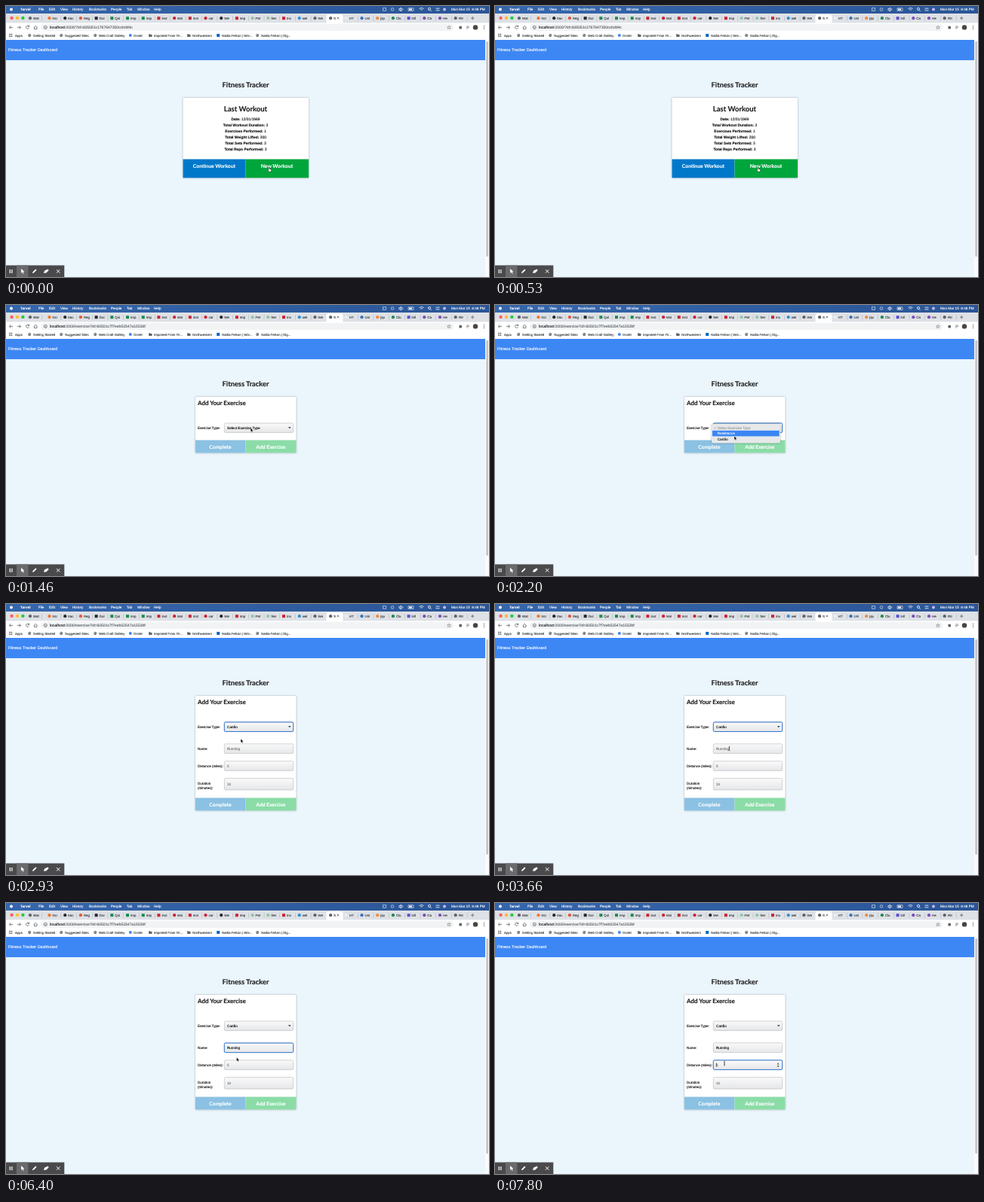
These frames come from a looping animation (640x360 px, 8 s). An HTML page:

```html
<!DOCTYPE html>
<html lang="en">
<head>
<meta charset="utf-8">
<title>Fitness Tracker</title>
<style>
html, body { margin: 0; width: 100%; height: 100%; overflow: hidden; }
svg { display: block; width: 640px; height: 360px; background: #ebf5fc; }
text { font-family: "Liberation Sans", Arial, sans-serif; text-rendering: geometricPrecision; white-space: pre; stroke-width: .13; }
.lato { font-family: Lato, sans-serif; font-weight: 700; }
.bold { font-weight: 700; }
.mid { text-anchor: middle; }
.card { filter: drop-shadow(0 .5px 1px #0005); }
.line { fill: none; stroke: #5f6368; stroke-width: .8; }
.white { fill: none; stroke: #fff; stroke-width: .8; }
.field { fill: url(#fieldFill); stroke: #b4b8bc; stroke-width: .6; }
.focus { fill: none; stroke: #3579d0; stroke-width: 1; }
</style>
</head>
<body>
<svg id="stage" viewBox="0 0 640 360"></svg>
<script>
const DURATION = 8000;
const CLICK = { page: 800, reload: 1060, select: 1600, cardio: 2600, name: 3760, distance: 6830 };
const KEYS = [5000, 5130, 5260, 5400, 5500, 5600, 5730];
const NAME = 'Running';

// Pointer stops: time, x, y
const PATH = [
  [0, 349, 217], [980, 349, 217], [1480, 324, 163], [1750, 324, 163], [2150, 317, 174],
  [2230, 317, 174], [2420, 311, 179], [3180, 311, 179], [3620, 310.5, 192],
  [6120, 310.5, 192], [6400, 305.5, 205], [6700, 304, 213], [8000, 304, 213]
];

const rect = (x, y, w, h, fill, extra = '') =>
  `<rect x="${x}" y="${y}" width="${w}" height="${h}" fill="${fill}" ${extra}/>`;
const dot = (x, y, r, fill) => `<circle cx="${x}" cy="${y}" r="${r}" fill="${fill}"/>`;
const path = (d, cls, extra = '') => `<path d="${d}" class="${cls}" ${extra}/>`;
// Text is placed by its left edge (or middle) and its vertical centre
const text = (x, y, size, str, fill = '#222', cls = '', id = '') =>
  `<text x="${x}" y="${y + size * .35}" font-size="${size}" fill="${fill}" stroke="${fill}" class="${cls}" id="${id}">${str}</text>`;
const group = (id, body, cls = '') => `<g id="${id}" class="${cls}">${body}</g>`;
const box = (y, h, cls = 'field', id = '') =>
  `<rect x="289.3" y="${y}" width="91.4" height="${h}" rx="1.5" class="${cls}" id="${id}"/>`;
const globe = (x, y) => dot(x, y, 2, '#5f6368') + path(`M${x - 1.3} ${y - .5}h1.4l1 1.2`, 'white', 'stroke-opacity=".8"');

function menuBar() {
  const items = [[43, 'File'], [57, 'Edit'], [72, 'View'], [88, 'History'], [110, 'Bookmarks'],
    [139, 'People'], [160, 'Tab'], [174, 'Window'], [196, 'Help']];
  return rect(0, 0, 640, 10, 'url(#barFill)') + dot(7, 4.5, 1.9, '#fff') +
    text(19, 4.6, 4.7, 'Tarvel', '#fff', 'bold') +
    items.map(([x, s]) => text(x, 4.6, 4.6, s, '#fff')).join('') +
    path('M499.5 2.7h4v3.6h-4zM513.8 4.5a1.8 1.8 0 1 1-3.6 0a1.8 1.8 0 1 1 3.6 0', 'white', 'opacity=".7"') +
    path('M521 3.5h1l1.5-1.2v4.6l-1.5-1.2h-1zM525 3q1.3 1.5 0 3', 'white') +
    path('M533 2.8h7v3.6h-7z', 'white', 'opacity=".7"') + rect(534, 3.6, 4, 2, '#fff') +
    path('M547.5 3.6q3-2.4 6 0M549 5.1q1.5-1 3 0', 'white') +
    path('M562.3 5.6l1.4 1.4M562.6 4a1.6 1.6 0 1 1-3.2 0a1.6 1.6 0 1 1 3.2 0', 'white') +
    path('M569.5 3.2h5M569.5 5.8h5', 'white') + dot(581, 4.5, 2, '#c9b8e8') +
    text(590, 4.6, 4.65, 'Mon Mar 15  8:48 PM', '#fff');
}

function tabs() {
  const names = 'Wat NU trac Reg Gui Qui Imp Imp Inst Moi Inst car We Imp FW Ser Ins wel We S HT Uni jqu Clu infi Ca He Fitr'.split(' ');
  const [grey, red, green, ink] = ['#5f6368', '#cb2431', '#1d8a4a', '#24292e'];
  const colors = [grey, '#f2762e', ink, '#e0573c', ink, green, green, green, red, red, red, red, ink, red,
    '#8fc7a3', '#8fc7a3', red, '#2d8fd5', grey, grey, '#e8eef2', '#3672b9', '#f08a3c', green, '#5a4fcf', '#7a4fb5', '#7a4fb5', grey];
  let out = rect(0, 10, 640, 12.5, '#dee1e6') + rect(424.5, 11.5, 22, 11.5, '#fff', 'rx="2"');
  ['#ff5f57', '#febc2e', '#28c840'].forEach((c, i) => out += dot(7.6 + 7.4 * i, 15.9, 2.2, c));
  names.forEach((name, i) => {
    const x = i ? 36.8 + 20.7 * i : 32;
    const square = [4, 5, 6, 7, 8, 10, 13, 16, 24].includes(i);
    out += square ? rect(x - 2, 14.2, 4, 4, colors[i]) : dot(x, 16.2, 2.1, colors[i]);
    out += text(x + 4, 16.2, 4.4, name, '#3c4043');
    if (i !== 18 && i !== 19) out += rect(x + 15.2, 13.5, .4, 6, '#9aa0a6');
  });
  return out + path('M438.6 14.8l2.6 2.6m0-2.6l-2.6 2.6', 'line') + path('M616 16.2h4.4m-2.2-2.2v4.4', 'line');
}

function toolbar() {
  const marks = [[36, 'Getting Started'], [78, 'Suggested Sites'], [123, 'Web Craft Gallery'], [169, 'Orvlet'],
    [196, 'Imported From Fir...'], [247, 'Northwestern'], [286, 'Nadia Felson | Wor...'], [338, 'Nadia Felson | Dig...']];
  let out = rect(0, 22.5, 640, 22.5, '#fff') + rect(46, 23.7, 547, 9.4, '#f1f3f4', 'rx="4.7"') +
    path('M9 28.4H4.4m2.1-2.1l-2.1 2.1l2.1 2.1M15 28.4h4.6m-2.1-2.1l2.1 2.1l-2.1 2.1', 'line') +
    group('reloadIcon', path('M30.5 27.2a2.1 2.1 0 1 0 .1 2M30.8 25.6v1.9h-1.9', 'line')) +
    group('stopIcon', path('M27 26.6l3.6 3.6m0-3.6l-3.6 3.6', 'line')) +
    path('M36.8 28.6l2.4-2.3l2.4 2.3M37.5 28.2v2.5h3.4v-2.5', 'line') +
    path('M54.3 28.4a2 2 0 1 1-4 0a2 2 0 1 1 4 0M52.3 28v1.5', 'line', 'stroke-width=".6"') +
    `<text x="58" y="30.1" font-size="5.05" fill="#5f6368" stroke="#5f6368"><tspan fill="#202124" stroke="#202124">localhost</tspan><tspan id="url"></tspan></text>` +
    path('M587 26.1l.7 1.6l1.7.1l-1.3 1.1l.5 1.7l-1.6-1l-1.6 1l.5-1.7l-1.3-1.1l1.7-.1z', 'line', 'style="stroke-width:.5"') +
    rect(600.4, 26.8, 3.6, 3.6, '#5f6368', 'rx="1"') + path('M610 27h4M610 28.5h4M610 30h2.4', 'line', 'style="stroke-width:.6"') +
    dot(622, 28.4, 3.2, '#4b4540');
  [26.4, 28.4, 30.4].forEach(y => out += dot(633.5, y, .55, '#5f6368'));
  for (let i = 0; i < 9; i++) out += rect(4 + i % 3 * 1.6, 36.8 + (i / 3 | 0) * 1.6, 1.1, 1.1, '#5f6368');
  out += text(12, 39, 4.35, 'Apps', '#3c4043');
  marks.forEach(([x, s], i) => {
    const at = x - 4.8;
    if (i === 3) out += dot(at + .6, 39, 2, '#4285f4');
    else if (i === 4 || i === 5) out += path(`M${at - 2} 37.2h1.6l.7.8h2v3h-4.3z`, '', 'fill="#5f6368"');
    else if (i === 6) out += rect(at - 2, 37, 4, 4, '#0a66c2');
    else out += globe(at, 39);
    out += text(x, 39, 4.35, s, '#3c4043');
  });
  return out;
}

function lastWorkout() {
  const rows = [['Date', '12/31/1969'], ['Total Workout Duration', 3], ['Exercises Performed', 1],
    ['Total Weight Lifted', 200], ['Total Sets Performed', 3], ['Total Reps Performed', 3]];
  return group('', rect(234.5, 122, 166.5, 106.3, '#fff', 'rx="1"'), 'card') +
    rect(234.5, 203.5, 83, 24.8, '#0078ca') + rect(317.5, 203.5, 83.5, 24.8, '#00a63c') +
    text(317.5, 136.5, 9.5, 'Last Workout', '#1b1c1d', 'lato mid') +
    rows.map(([k, v], i) => text(317.5, 150.3 + 8 * i, 4.9, `<tspan font-weight="700">${k}:</tspan> ${v}`, '#111', 'mid')).join('') +
    text(276, 212.3, 6.8, 'Continue Workout', '#fff', 'lato mid') +
    text(359, 212.3, 6.8, 'New Workout', '#fff', 'lato mid');
}

function exercise() {
  const label = (y, s) => text(254, y, 4.55, s, '#111');
  return group('', rect(251, 122, 133.5, 74.5, '#fff', 'rx="1" id="card"'), 'card') +
    text(254, 130.3, 8, 'Add Your Exercise', '#1b1c1d', 'lato') +
    label(163.2, 'Exercise Type:') + box(157, 12.4) + box(156.9, 12.6, 'focus', 'selectFocus') +
    text(293, 163.2, 4.7, '', '#000', '', 'selected') +
    path('M374 162.1h3.6l-1.8 2.1z', '', 'fill="#234a72"') +
    group('form',
      label(192.5, 'Name:') + label(215.2, 'Distance (miles):') + label(238.4, 'Duration') + label(244.4, '(minutes):') +
      box(185.8, 12.8) + box(208.8, 12.6) + box(231.6, 15.4) +
      text(293, 192.3, 4.6, '', '#111', '', 'name') + text(293, 215.2, 4.6, '5', '#777') + text(293, 239.4, 4.6, '10', '#777') +
      box(186, 12.6, 'focus', 'nameFocus') + box(208.8, 12.6, 'focus', 'distanceFocus') +
      group('spinner', path('M373.6 214.5h3l-1.5-2.2zM373.6 216h3l-1.5 2.2z', '', 'fill="#555"')) +
      rect(293, 189.6, .6, 5.4, '#111', 'id="nameCaret"') + rect(292.9, 212.4, .6, 5.4, '#111', 'id="distanceCaret"')) +
    group('buttons',
      rect(251, 179.5, 66.5, 17, '#8bc1e2', 'id="blue"') + rect(317.5, 179.5, 67, 17, '#8bdca7', 'id="green"') +
      group('buttonText', text(284, 188.3, 6.8, 'Complete', '#fff', 'lato mid') +
        text(350.8, 188.3, 6.8, 'Add Exercise', '#fff', 'lato mid'))) +
    group('menu',
      group('', rect(287, 158, 91, 25.6, '#e6e8ea', 'rx="2"'), 'card') +
      rect(288, 166.8, 88.7, 7.6, '#3a86f5', 'id="rowMark"') +
      path('M290.3 163.3l1 1.1l1.6-2.7', 'line', 'style="stroke:#999;stroke-width:.6"') +
      text(294.7, 163.1, 4.7, 'Select Exercise Type', '#999') +
      text(294.7, 170.8, 4.7, 'Resistance', '#111', '', 'row0') + text(294.7, 178.6, 4.7, 'Cardio', '#111', '', 'row1'));
}

function recorder() {
  return rect(0, 344.5, 77.3, 15.5, '#4a4a4c') + rect(14, 344.5, 15.5, 15.5, '#6a6a6d') +
    path('M5.3 350v5M7.9 350v5', 'white', 'style="stroke-width:1.2"') +
    path('M20 349l.2 5.8l1.4-1.2l1.1 2.2l1-.5l-1.1-2.1l1.8-.2z', '', 'fill="#fff"') +
    path('M35 355l.5-1.8l3.8-3.8l1.3 1.3l-3.8 3.8z', '', 'fill="#fff"') +
    path('M49.8 354.8l1.4-3.4l4.4-2l1 1.8l-3.2 3.4z', '', 'fill="#fff"') +
    path('M67 350.2l4.4 4.4m0-4.4l-4.4 4.4', 'white', 'style="stroke-width:1"');
}

document.getElementById('stage').innerHTML =
  `<defs><linearGradient id="fieldFill" x2="0" y2="1"><stop stop-color="#fafafa"/><stop offset="1" stop-color="#e5e6e8"/></linearGradient>
  <linearGradient id="barFill"><stop stop-color="#3566ac"/><stop offset="1" stop-color="#2a5596"/></linearGradient></defs>` +
  rect(635, 45, 5, 315, '#fafafa') + rect(636.3, 47, 2.6, 286, '#c1c1c1', 'rx="1.3"') +
  rect(0, 45, 635, 27, '#3d87f5') + text(3, 57.6, 5.45, 'Fitness Tracker Dashboard', '#fff') +
  text(317.5, 105, 9.3, 'Fitness Tracker', '#1b1c1d', 'lato mid') +
  menuBar() + tabs() + toolbar() + group('home', lastWorkout()) + group('exercise', exercise()) + recorder() +
  group('status', rect(-1, 352.8, 214, 9, '#dee1e6', 'rx="1" stroke="#b5b9be" stroke-width=".5"') +
    text(1.5, 356.8, 4.4, 'Waiting for localhost...', '#3c4043')) +
  group('pointer',
    group('arrow', path('M0 0v5.2l1.2-1l.8 1.9l.9-.4l-.8-1.8h1.6z', '', 'fill="#000" stroke="#fff" stroke-width=".4"')) +
    group('hand', path('M-1.2-2.6q.7-.6 1.1.2l.2 1.8l2.2.5q.6.3.3 1.6l-.5 1.7h-2.6l-1.8-2.2q0-.8.9-.2z', '', 'fill="#fff" stroke="#000" stroke-width=".5"')) +
    group('beam', path('M-1-2.8q1 0 1 .7v4.2q0 .7-1 .7M1-2.8q-1 0-1 .7v4.2q0 .7 1 .7', 'line', 'style="stroke:#222;stroke-width:.5"')));

const el = {};
document.querySelectorAll('svg [id]').forEach(node => { if (node.id) el[node.id] = node; });
const show = (id, on) => { el[id].style.display = on ? '' : 'none'; };
const setText = (id, str) => { if (el[id].textContent !== str) el[id].textContent = str; };
const setInk = (id, color) => ['fill', 'stroke'].forEach(attr => el[id].setAttribute(attr, color));

function pointerAt(t) {
  const i = PATH.findIndex(stop => stop[0] > t);
  const [t0, x0, y0] = PATH[i - 1], [t1, x1, y1] = PATH[i];
  const u = (t - t0) / (t1 - t0), k = u * u * (3 - 2 * u);
  return [x0 + (x1 - x0) * k, y0 + (y1 - y0) * k];
}

function render(t) {
  const onHome = t < CLICK.page, loading = !onHome && t < CLICK.reload, cardio = t >= CLICK.cardio;
  show('home', onHome);
  show('exercise', !onHome);
  show('status', loading);
  show('stopIcon', loading);
  show('reloadIcon', !loading);
  setText('url', ':3000/' + (onHome ? '?id=605051c1767647350ccbdd4c' : loading ? 'exercise' : 'exercise?id=60501c7f7eeb52547a1553bf'));

  el.blue.setAttribute('fill', loading ? '#a9d4ee' : '#8bc1e2');
  el.green.setAttribute('fill', loading ? '#a6e6bc' : '#8bdca7');
  el.buttonText.setAttribute('opacity', loading ? .35 : 1);
  el.buttons.setAttribute('transform', `translate(0 ${cardio ? 78 : 0})`);
  el.card.setAttribute('height', cardio ? 152.5 : 74.5);
  setText('selected', cardio ? 'Cardio' : 'Select Exercise Type');
  show('form', cardio);

  const [x, y] = pointerAt(t);
  const row = y > 174.8 ? 1 : y > 166.8 ? 0 : -1;
  show('menu', t >= CLICK.select && !cardio);
  show('rowMark', row >= 0);
  el.rowMark.setAttribute('y', 166.8 + 7.8 * Math.max(row, 0));
  [0, 1].forEach(i => setInk('row' + i, row === i ? '#fff' : '#111'));

  const inName = t >= CLICK.name && t < CLICK.distance, inDistance = t >= CLICK.distance;
  const typed = KEYS.filter(k => k <= t).length;
  setText('name', typed ? NAME.slice(0, typed) : NAME);
  setInk('name', typed ? '#111' : '#777');
  show('selectFocus', t >= CLICK.select && t < CLICK.name);
  show('nameFocus', inName);
  show('distanceFocus', inDistance);
  show('spinner', inDistance);

  const blink = since => (t - since) % 970 < 500;
  show('nameCaret', inName && blink(typed ? KEYS[typed - 1] : CLICK.name));
  show('distanceCaret', inDistance && blink(CLICK.distance));
  el.nameCaret.setAttribute('x', typed ? 293.2 + el.name.getComputedTextLength() : 292.9);

  const overField = cardio && (y > 185.8 && y < 198.6 || y > 208.8 && y < 221.4);
  const hand = t < CLICK.reload;
  show('hand', hand);
  show('beam', overField);
  show('arrow', !hand && !overField);
  el.pointer.setAttribute('transform', `translate(${x} ${y})`);
}

(function tick() {
  render(performance.now() % DURATION);
  requestAnimationFrame(tick);
})();
</script>
</body>
</html>
```
